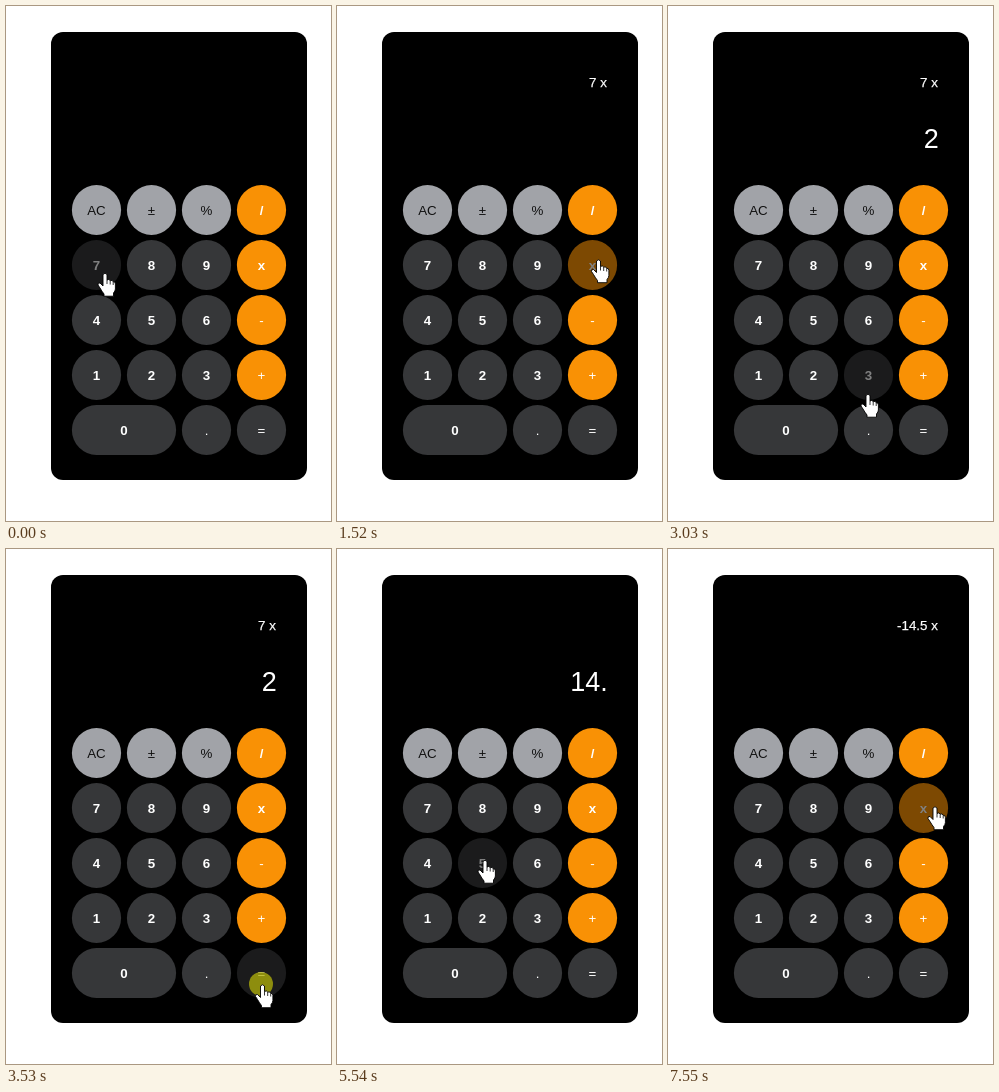
Recreate the animation shown at these times as an HTML page. Size 325 by 515 pixels, loop 8000 ms.

```html
<!DOCTYPE html>
<html lang="en">
<head>
<meta charset="utf-8">
<title>Calculator</title>
<style>
  html, body { margin: 0; width: 100%; height: 100%; overflow: hidden; background: #fff; }
  svg { display: block; width: 325px; height: 515px; font-family: "Liberation Sans", Arial, sans-serif; }
  .key { font-size: 13.33px; text-anchor: middle; fill: #fff; }
  .light { fill: #111; }
  .bold { font-weight: bold; }
  .display { fill: #fff; text-anchor: end; white-space: pre; }
</style>
</head>
<body>
<svg viewBox="0 0 325 515">
  <rect x="45" y="26" width="256" height="448" rx="12"/>
  <text id="upper" class="display" x="269.8" y="81" font-size="13.33" stroke="#fff" stroke-width=".25"></text>
  <text id="lower" class="display" x="270.8" y="142" font-size="27"></text>
  <g id="keys"></g>
  <circle id="press" cx="255" cy="435" r="12" fill="#ff0" opacity=".5"/>
  <g id="hand">
    <path fill="#fff" stroke="#000" stroke-width=".9" stroke-linejoin="round"
      d="M-2 1.5Q0-1 2 1.5V7Q4 5.5 5.2 7.6Q7.4 6.6 8.2 8.8Q10.4 8.4 10.4 11V16Q10.3 18 8.5 20V23.2H-1V21Q-3 18.5-5 15L-7 12Q-7.4 9.5-5 10L-2 13Z"/>
    <path fill="none" stroke="#000" stroke-width=".8" d="M2 7V11M5.2 7.6V11.5M8.2 8.8V12"/>
  </g>
</svg>
<script>
const LOOP = 8000;
const $ = id => document.getElementById(id);
const ROWS = [
  ["AC", "±", "%", "/"],
  ["7", "8", "9", "x"],
  ["4", "5", "6", "-"],
  ["1", "2", "3", "+"],
  ["0", "", ".", "="]
];
const DARK = "#363739", LIGHT = "#a1a3a8", ORANGE = "#f99105";

function add(parent, tag, attrs, text = "") {
  const el = document.createElementNS("http://www.w3.org/2000/svg", tag);
  for (const name in attrs) el.setAttribute(name, attrs[name]);
  el.textContent = text;
  parent.append(el);
  return el;
}

const keys = {};
ROWS.forEach((row, r) => row.forEach((label, c) => {
  if (!label) return;
  const x = 65.9 + c * 55, y = 179.1 + r * 55;
  const width = label === "0" ? 104.2 : 49.2;
  const light = r === 0 && c < 3;
  const fill = light ? LIGHT : c === 3 && r < 4 ? ORANGE : DARK;
  const group = add($("keys"), "g", {});
  add(group, "rect", { x, y, width, height: 49.8, rx: 24.6, ry: 24.9, fill });
  const style = "key" + (light ? " light" : /[\dx/]/.test(label) ? " bold" : "");
  add(group, "text", { x: x + width / 2, y: y + 29.5, class: style }, label);
  keys[label] = group;
}));

// start, hovered key, pointer x, pointer y, upper line, lower line
const STEPS = [
  [0, "7", 99, 267, "", ""],
  [510, "7", 100, 258, "", "7"],
  [1010, "x", 261.5, 253.5, "", "7"],
  [1520, "x", 261.5, 253.5, "7 x", ""],
  [2020, "2", 150, 360, "7 x", ""],
  [2520, "2", 150, 360, "7 x", "2"],
  [3030, "3", 200, 388, "7 x", "2"],
  [3530, "=", 256.5, 435.5, "7 x", "2"],
  [4030, "=", 256.5, 435.5, "", "14"],
  [4540, ".", 206.5, 418, "", "14"],
  [5040, ".", 206.5, 418, "", "14."],
  [5540, "5", 148, 311, "", "14."],
  [6040, "5", 148, 311, "", "14.5"],
  [6540, "±", 140, 204.5, "", "-14.5"],
  [7040, "x", 267, 257.5, "", "-14.5"],
  [7550, "x", 267, 257.5, "-14.5 x", ""]
];

function draw(time) {
  const [start, hovered, x, y, upper, lower] = STEPS.findLast(step => step[0] <= time);
  for (const label in keys) keys[label].setAttribute("opacity", label === hovered ? 0.5 : 1);
  $("hand").setAttribute("transform", `translate(${x} ${y})`);
  $("press").setAttribute("visibility", start === 3530 ? "visible" : "hidden");
  $("upper").textContent = upper;
  $("lower").textContent = lower;
}

const origin = performance.now();
function tick() {
  draw((performance.now() - origin) % LOOP);
  requestAnimationFrame(tick);
}
tick();
</script>
</body>
</html>
```
